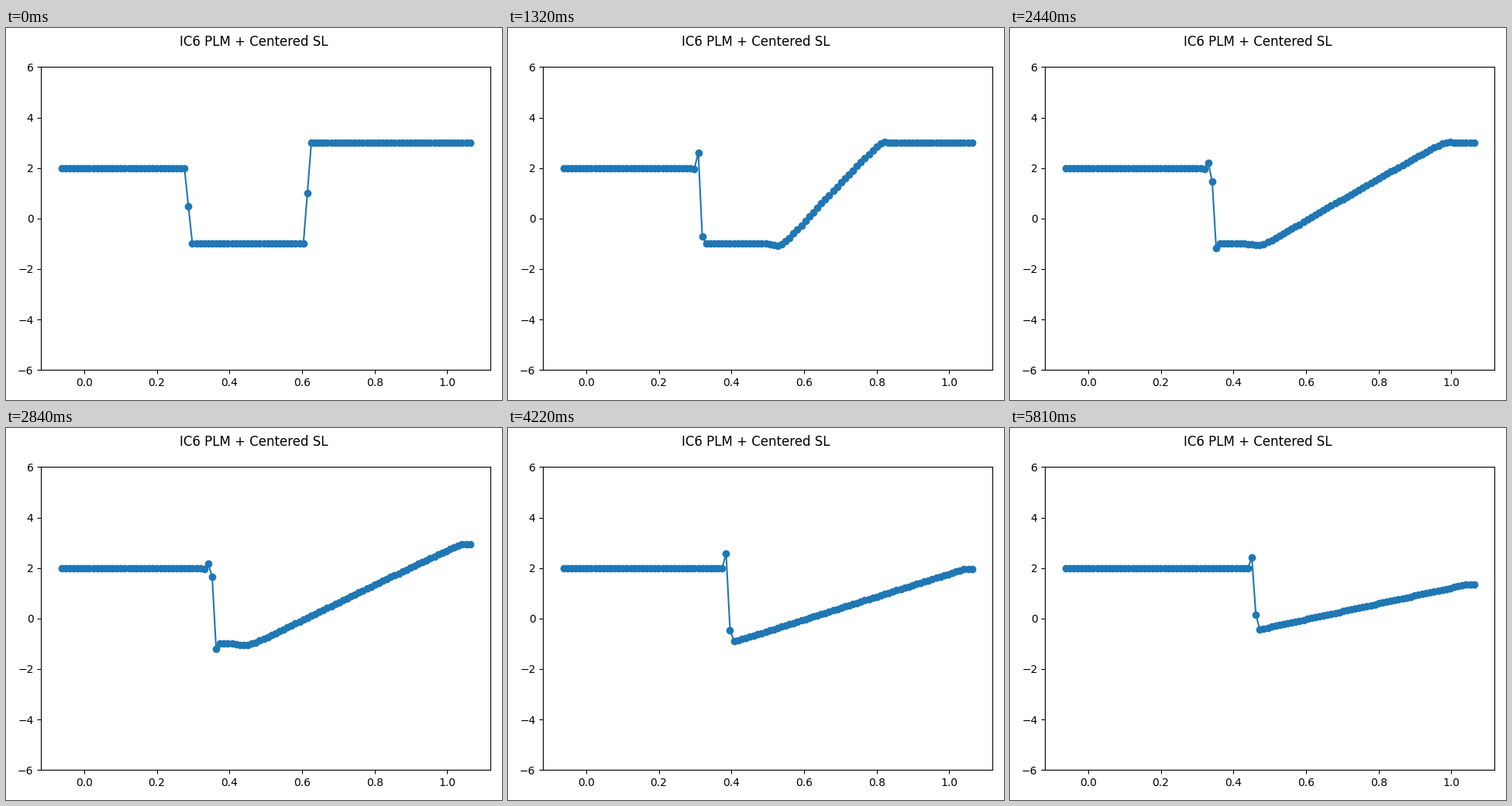
A matplotlib script that plays this animation: 640x480 px, repeating every 5.88 s.

```python
import numpy as np
import matplotlib.pyplot as plt
from matplotlib.animation import FuncAnimation

LOOP_MS = 5880
FRAMES = 89
CELLS, GHOSTS = 100, 2
CFL = 0.9


def initial_state():
    """Two jumps, each with one cell at the mean of its sides."""
    i = np.arange(-GHOSTS, CELLS + GHOSTS)
    return 2 - 1.5 * (np.sign(i - 30) + 1) + 2.0 * (np.sign(i - 60) + 1)


def godunov_flux(left, right):
    """Exact Riemann flux for Burgers' equation."""
    shock = np.where(left + right > 0, left, right)
    fan = np.clip(0, left, np.maximum(left, right))
    return 0.5 * np.where(left > right, shock, fan) ** 2


def step(u):
    """Piecewise linear update, centered slopes traced at the face speed."""
    ratio = CFL / np.abs(u).max()
    slope = np.gradient(u)
    shift = ratio * (u[:-1] + u[1:]) / 2
    left = u[:-1] + 0.5 * (1 - shift) * slope[:-1]
    right = u[1:] - 0.5 * (1 + shift) * slope[1:]
    new = u.copy()
    new[1:-1] -= ratio * np.diff(godunov_flux(left, right))
    new[:GHOSTS] = new[GHOSTS]
    new[-GHOSTS:] = new[-GHOSTS - 1]
    return new


states = [initial_state()]
while len(states) < FRAMES:
    states.append(step(states[-1]))

x = np.linspace(-1 / 16, 17 / 16, CELLS + 2 * GHOSTS)

fig, ax = plt.subplots(figsize=(6.4, 4.8), dpi=100)
line, = ax.plot(x, states[0], "o-", color="#1f77b4")
ax.set_ylim(-6, 6)
fig.suptitle("IC6 PLM + Centered SL", y=0.982)
fig.tight_layout()
fig.subplots_adjust(top=0.895)


def draw(frame):
    line.set_ydata(states[frame])
    return line,


anim = FuncAnimation(fig, draw, frames=FRAMES, interval=LOOP_MS / FRAMES,
                     repeat=True, repeat_delay=0)
plt.show()
```
